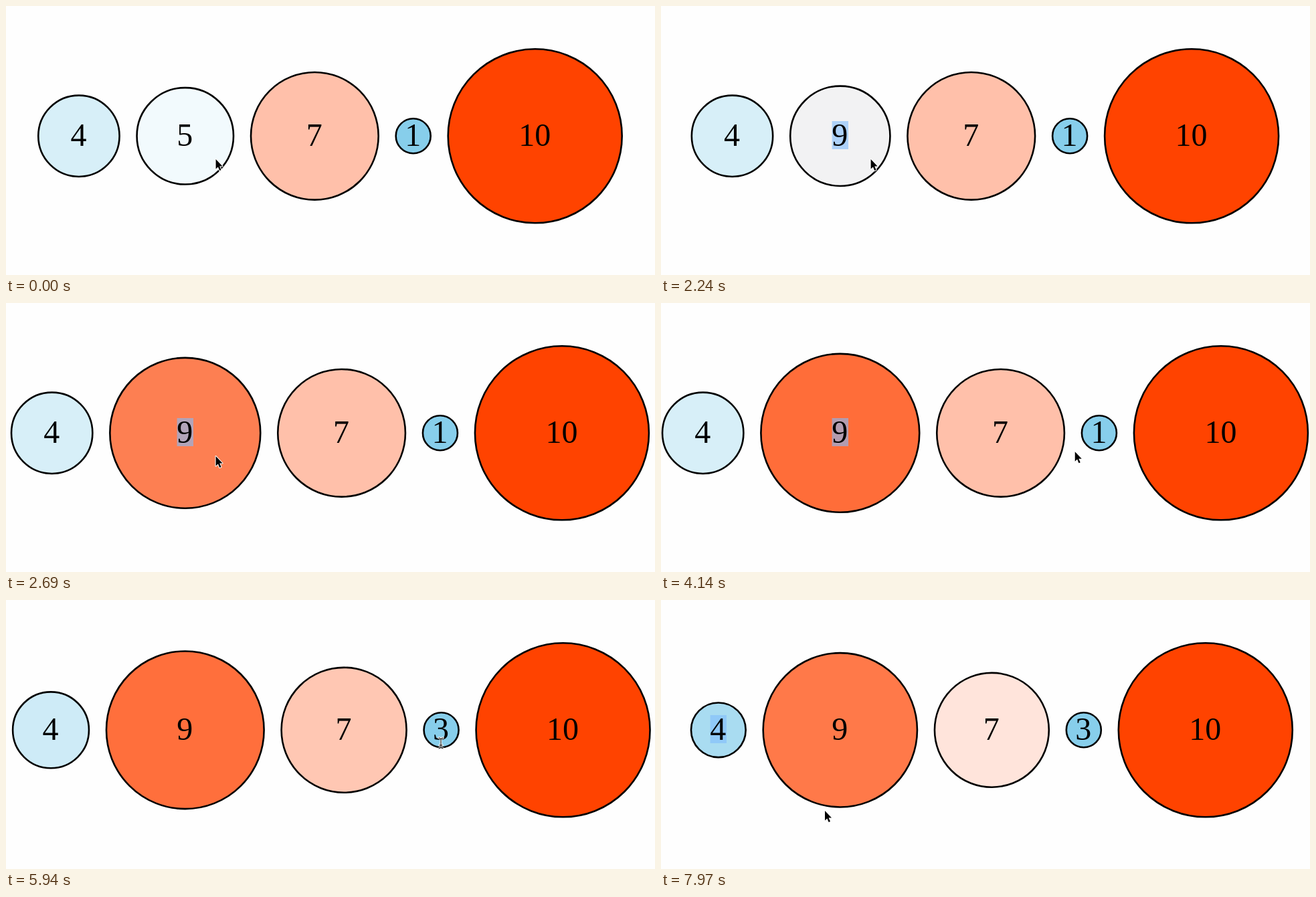
Animation of 970 by 402 pixels, one loop 8000 ms. Source, as an HTML page:

```html
<!DOCTYPE html>
<html lang="en">
<head>
<meta charset="utf-8">
<title>Sized circles</title>
<style>
  html, body { margin: 0; width: 100%; height: 100%; overflow: hidden; background: #fefefe; }
  svg { display: block; }
  text { font: 48px "Liberation Serif", serif; text-anchor: middle; }
</style>
</head>
<body>
<svg id="stage" width="970" height="402" viewBox="0 0 970 402">
  <defs><path id="caret" d="M-3-8Q0-8 0-6V6Q0 8-3 8M3-8Q0-8 0-6M0 6Q0 8 3 8M-2 3H2"/></defs>
  <g id="circles"></g>
  <path id="arrow" d="M0 0V14.5L3.3 11.4L5.7 17L8 16L5.6 10.6H10Z"
        stroke="#fff" stroke-width="2" paint-order="stroke" stroke-linejoin="round"/>
  <g id="beam" fill="none" stroke-linecap="square">
    <use href="#caret" stroke="#fff" stroke-width="3"/>
    <use href="#caret" stroke="#000"/>
  </g>
</svg>
<script>
const LOOP = 8000, DURATION = 1000, DELAY = 100;
const GAP = 26, ANCHOR = 1, ANCHOR_X = 267.8, CENTER_Y = 194.3;
const LOW = [135, 206, 235], MIDDLE = [255, 255, 255], HIGH = [255, 67, 0];
const START = [4, 5, 7, 1, 10];

// The second number is stepped up to 9, later the fourth is retyped.
const EDITS = [6, 7, 8, 9].map((value, i) => ({ at: 1670 + 80 * i, circle: 1, value }));
EDITS.push({ at: 5480, circle: 3, value: 3 });

const SELECTIONS = [
  { from: 1190, to: 4950, circle: 1 },
  { from: 5070, to: 5480, circle: 3 },
  { from: 7550, to: LOOP, circle: 0 }
];

const REST = [313.6, 229];
const MOVES = [
  { from: 3000, to: 3480, goal: [608, 225] },
  { from: 4060, to: 4650, goal: [650, 214] },
  { from: 6150, to: 6570, goal: [219, 207] },
  { from: 6690, to: 7200, goal: [104, 216] },
  { from: 7850, to: 7970, goal: [245, 315] }
];

const clamp = t => Math.min(1, Math.max(0, t));
const mix = (a, b, p) => a.map((v, i) => v + (b[i] - v) * p);
const easeOut = t => 1 - (1 - t) ** 2;
const easeInOut = t => t < .5 ? 4 * t ** 3 : 1 - 4 * (1 - t) ** 3;

const numbersAfter = count => {
  const numbers = [...START];
  EDITS.slice(0, count).forEach(({ circle, value }) => numbers[circle] = value);
  return numbers;
};

// Each shape is [diameter, red, green, blue].
function shapesFor(numbers) {
  const min = Math.min(...numbers), max = Math.max(...numbers);
  return numbers.map(n => {
    const k = (n - min) / (max - min);
    const color = k < .5 ? mix(LOW, MIDDLE, k * 2) : mix(MIDDLE, HIGH, k * 2 - 1);
    return [52 + 208 * k, ...color];
  });
}

// Every edit restarts the transition from the current look.
function shapesAt(time) {
  return EDITS.reduce((shapes, { at }, i) => {
    const end = Math.min(time, (EDITS[i + 1]?.at ?? LOOP) + DELAY);
    const p = easeInOut(clamp((end - at - DELAY) / DURATION));
    const goal = shapesFor(numbersAfter(i + 1));
    return shapes.map((shape, j) => mix(shape, goal[j], p));
  }, shapesFor(START));
}

const pointerAt = time => MOVES.reduce((point, { from, to, goal }) =>
  mix(point, goal, easeOut(clamp((time - from) / (to - from)))), REST);

const set = (node, attributes) => {
  for (const name in attributes) node.setAttribute(name, attributes[name]);
};
const add = (name, attributes) => {
  const node = document.createElementNS("http://www.w3.org/2000/svg", name);
  set(node, attributes);
  return document.getElementById("circles").appendChild(node);
};
const visibility = shown => shown ? "visible" : "hidden";

const nodes = START.map(() => ({
  circle: add("circle", { cy: CENTER_Y, stroke: "#000", "stroke-width": 2.6 }),
  mark: add("rect", { y: 172, width: 24.4, height: 42, fill: "rgba(128,188,254,.6)" }),
  label: add("text", { y: 208.5 })
}));
const arrow = document.getElementById("arrow"), beam = document.getElementById("beam");

function draw(time) {
  const numbers = numbersAfter(EDITS.filter(({ at }) => at <= time).length);
  const shapes = shapesAt(time);
  const before = shapes.slice(0, ANCHOR).reduce((sum, s) => sum + s[0] + GAP, 0);
  let left = ANCHOR_X - shapes[ANCHOR][0] / 2 - before;

  shapes.forEach(([diameter, ...color], i) => {
    const { circle, mark, label } = nodes[i], x = left + diameter / 2;
    const selected = SELECTIONS.some(s => s.circle === i && time >= s.from && time < s.to);
    set(circle, { cx: x, r: diameter / 2, fill: `rgb(${color.map(Math.round)})` });
    set(mark, { x: x - 12.2, visibility: visibility(selected) });
    set(label, { x: x - .5 });
    label.textContent = numbers[i];
    left += diameter + GAP;
  });

  const [x, y] = pointerAt(time), overText = x > 640;
  const transform = `translate(${x} ${y})`;
  set(arrow, { transform, visibility: visibility(!overText) });
  set(beam, { transform, visibility: visibility(overText) });
}

const origin = performance.now();
function tick() {
  draw((performance.now() - origin) % LOOP);
  requestAnimationFrame(tick);
}
tick();
</script>
</body>
</html>
```
